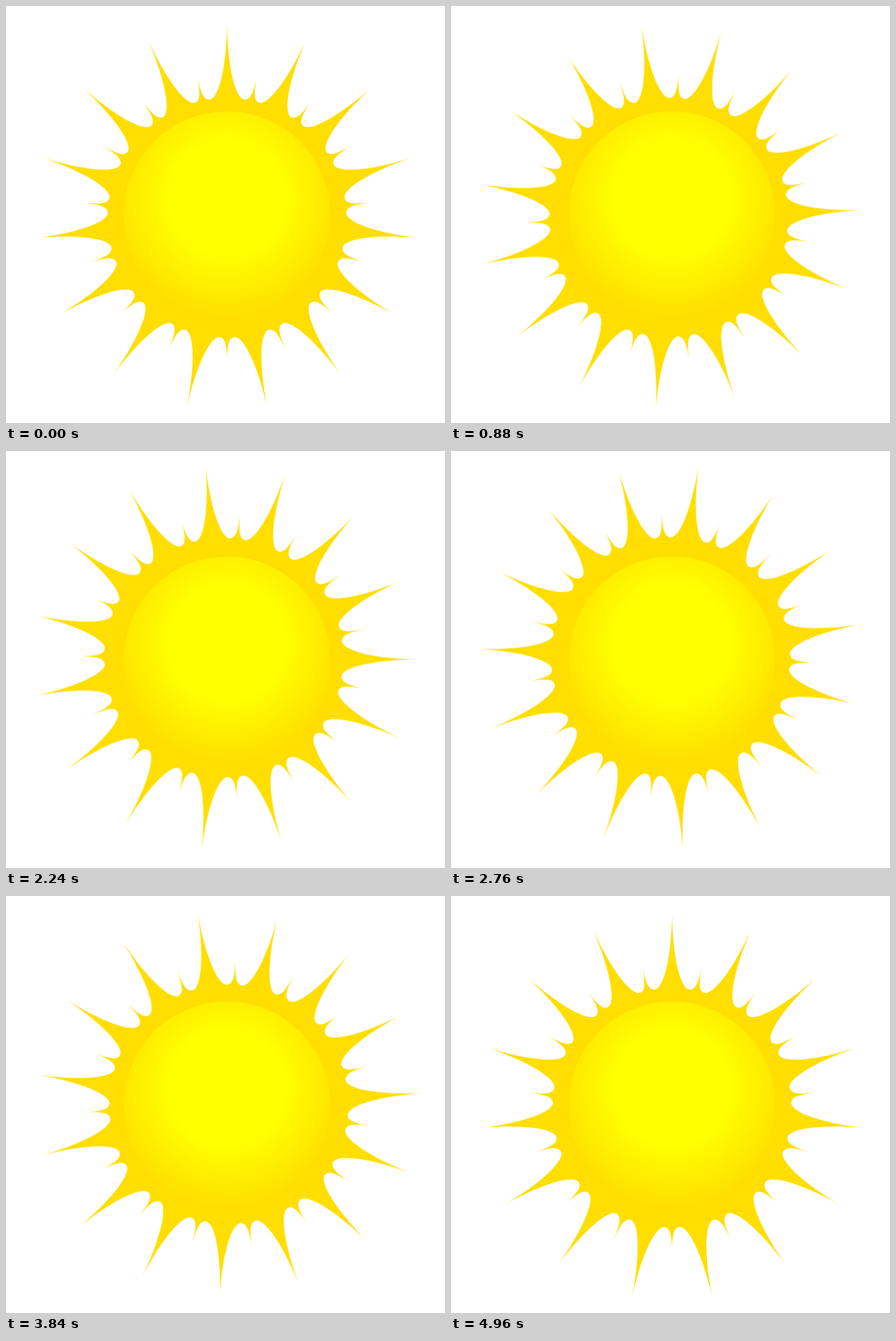
An HTML page for the animation above (5 s loop, 600 px wide and 569 px high).

```html
<!DOCTYPE html>
<html lang="en">
<head>
<meta charset="utf-8">
<title>Spinning sun</title>
<style>
  html, body { margin: 0; width: 100%; height: 100%; overflow: hidden; background: #fff; }
  svg { display: block; width: 100%; height: 100%; }
  /* 125 steps of 40 ms; the last step completes the turn and matches the first */
  #rays {
    fill: #ffde00;
    transform-origin: 300.4px 285.1px;
    animation: spin 5s steps(125, end) -3ms infinite;
  }
  @keyframes spin {
    from { transform: rotate(0deg); }
    to { transform: rotate(362.9032deg); }
  }
</style>
</head>
<body>
<svg viewBox="0 0 600 569">
  <defs>
    <radialGradient id="glow" gradientUnits="userSpaceOnUse" cx="302" cy="262" r="165">
      <stop offset=".47" stop-color="#ff0"/>
      <stop offset="1" stop-color="#ffde00"/>
    </radialGradient>
  </defs>
  <path id="rays"/>
  <circle cx="302" cy="285" r="141.3" fill="url(#glow)"/>
</svg>
<script>
  const COUNT = 15, CX = 302.1, CY = 289;

  // Right half of one long ray: tip, valley, then the short tip beside it
  const tip = [0, -263.5];
  const half = [[1, -200], [12.5, -161.2], [24.4, -161.2],
                [32, -161.2], [36, -171], [40.6, -191]];
  const left = [tip, ...half].map(([x, y]) => [-x, y]).reverse();
  const ray = [...left.slice(1), ...half];

  const place = ([x, y], a) => {
    const c = Math.cos(a), s = Math.sin(a);
    return (CX + x * c - y * s).toFixed(2) + ' ' + (CY + x * s + y * c).toFixed(2);
  };

  let d = 'M' + place(left[0], 0);
  for (let i = 0; i < COUNT; i++) {
    d += 'C' + ray.map(p => place(p, i * 2 * Math.PI / COUNT)).join(' ');
  }
  document.getElementById('rays').setAttribute('d', d + 'Z');
</script>
</body>
</html>
```
